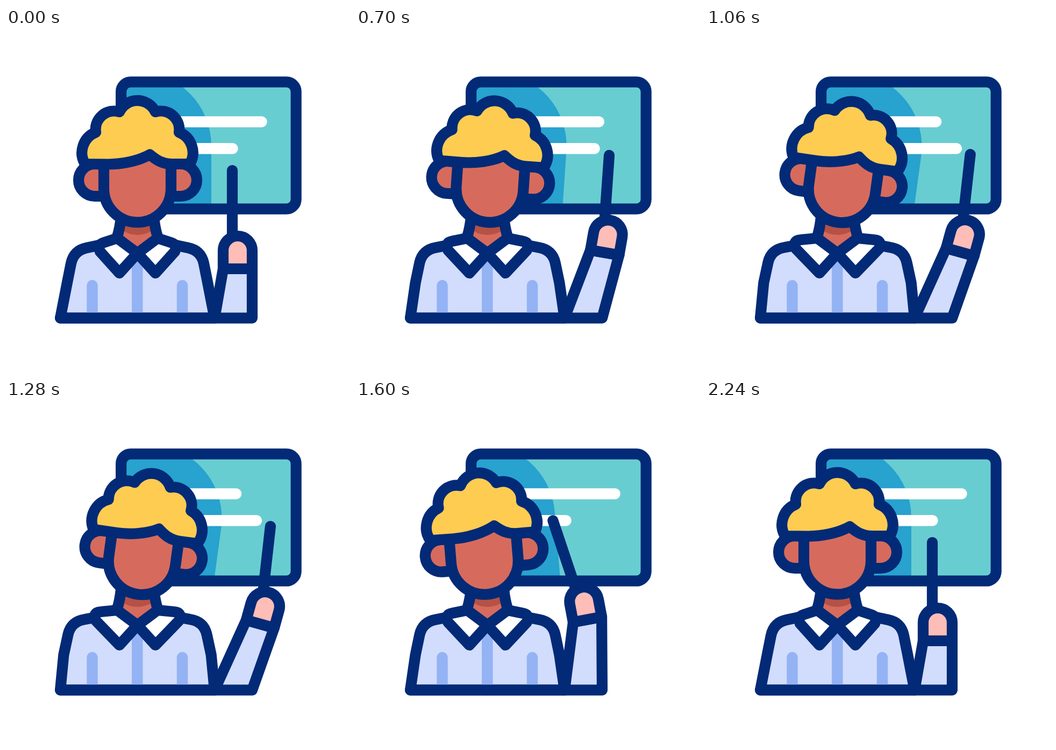
Write an HTML page that moves like this. It is 640 px wide and 640 px high and loops after 2.42 s.

```html
<!DOCTYPE html>
<html lang="en">
<head>
<meta charset="utf-8">
<title>Teacher at the board</title>
<style>
  html, body { margin: 0; width: 100%; height: 100%; overflow: hidden; background: #fff; }
  svg { display: block; width: 100%; height: 100%; }
  .ink { stroke: #032a76; stroke-width: 20.2; stroke-linecap: round; stroke-linejoin: round; }
  .open { fill: none; }
  .skin { fill: #d66b5d; }
  .shirt { fill: #d2dcfd; }
  .bar { stroke-width: 20.5; stroke-linecap: round; }
</style>
</head>
<body>
<svg viewBox="0 0 640 640">
  <defs>
    <clipPath id="screen"><rect x="214" y="100" width="326" height="237" rx="18"/></clipPath>
  </defs>

  <!-- board -->
  <g clip-path="url(#screen)">
    <rect x="214" y="100" width="326" height="237" fill="#68cdd1"/>
    <path id="shade" fill="#28a2ce" d="M106 219a138 138 0 0 1 276 0V420H106Z"/>
    <g class="bar" stroke="#fff">
      <path id="line1" d="M250 174.5H475.5"/>
      <path id="line2" d="M280 224.2H421.5"/>
    </g>
  </g>
  <rect class="ink open" x="214.1" y="100.3" width="325.6" height="236.4" rx="18"/>

  <!-- shirt and neck: left halves are mirrored -->
  <path id="coat" class="ink shirt"/>
  <use href="#coat" transform="translate(489) scale(-1 1)"/>
  <path class="bar" stroke="#94b3f4" d="M160.5 479V534M244.3 430V534M328 479V534"/>
  <path class="ink" d="M101 539.6H388"/>
  <path class="skin" d="M212 350H277L282 390L244.5 419L207 390Z"/>
  <path fill="#b65145" d="M212 350H277L281 371Q244.5 399 208 371Z"/>
  <path class="ink open" d="M214 352Q212 372 207 388M275 352Q277 372 282 388"/>
  <path id="collar" class="ink" fill="#fff"/>
  <use href="#collar" transform="translate(489) scale(-1 1)"/>

  <g id="head">
    <path class="ink skin" d="M182 253H165a30 30 0 0 0 0 60H186ZM307 253H325a30 30 0 0 1 0 60H303Z"/>
    <path class="ink skin" d="M182 236V299a62.5 62.5 0 0 0 125 0V236Z"/>
    <path class="ink" fill="#ffcc52" d="M147 253A41 41 0 0 1 167 194A34.4 34.4 0 0 1 211 156A37.2 37.2 0 0 1 278 156A34.4 34.4 0 0 1 322 194A41 41 0 0 1 342 253H310C290 253 279 245 267.5 235.5C245 248 215 253.5 190 253.5Z"/>
  </g>

  <!-- arm -->
  <path id="pointer" class="ink"/>
  <path id="sleeve" class="ink shirt"/>
  <path id="hand" class="ink" fill="#ffbdb8" d="M-27 34V0a27 27 0 0 1 54 0V34Z"/>
</svg>
<script>
  const LOOP = 2420;
  const parts = {};
  document.querySelectorAll('path[id], g[id]').forEach(el => parts[el.id] = el);
  const set = (id, name, value) => parts[id].setAttribute(name, value);

  const smooth = u => u * u * (3 - 2 * u);
  const settle = u => smooth(1 - (1 - u) ** 2); // quick start, long tail
  const progress = (t, from, to, ease) => ease(Math.min(1, Math.max(0, (t - from) / (to - from))));

  // Runs a pose through successive moves: [target pose, start, end, easing].
  const follow = (t, pose, moves) => moves.reduce((now, [goal, from, to, ease]) => {
    const p = progress(t, from, to, ease);
    return now.map((v, i) => v + (goal[i] - v) * p);
  }, pose);

  // hand x, hand y, hand angle, pointer tip x, tip y
  const arm = {
    rest: [431, 414, 0, 421, 265],
    lift: [445, 385, 0, 434, 240],
    right: [482, 384, 15.5, 492, 235],
    left: [422.3, 374.7, -11.5, 362, 224]
  };
  // head angle, shift of each line on the board
  const look = { rest: [0, 0, 0], right: [7.8, -47.5, 44.5], left: [-5.1, 8, -33.5] };

  function drawArm(t) {
    const [x, y, angle, tipX, tipY] = follow(t, arm.rest, [
      [arm.lift, 0, 400, smooth],
      [arm.right, 400, 1230, settle],
      [arm.left, 1280, 1760, settle],
      [arm.rest, 1760, 2240, smooth]
    ]);
    const c = Math.cos(angle * Math.PI / 180), s = Math.sin(angle * Math.PI / 180);
    const onHand = (dx, dy) => `${x + dx * c - dy * s} ${y + dx * s + dy * c}`;
    set('hand', 'transform', `translate(${x} ${y}) rotate(${angle})`);
    set('sleeve', 'd', `M388 539.6L${onHand(-27, 34)}L${onHand(27, 34)}L458 539.6Z`);
    set('pointer', 'd', `M${tipX} ${tipY}L${onHand(-10, -20)}`);
  }

  function drawLook(t) {
    const [turn, shift1, shift2] = follow(t, look.rest, [
      [look.right, 520, 1140, settle],
      [look.left, 1280, 1760, settle],
      [look.rest, 1760, 2240, smooth]
    ]);
    for (const id of ['head', 'shade']) set(id, 'transform', `rotate(${turn} 244.5 363)`);
    set('line1', 'transform', `translate(${shift1})`);
    set('line2', 'transform', `translate(${shift2})`);
  }

  function drawShirt(t) {
    const k = progress(t, 520, 1140, settle) * (1 - progress(t, 1280, 1920, smooth));
    set('coat', 'd', `M244.5 539.6H101L${113.8 - 6.5 * k} 474L${121 - 5.5 * k} ${438 - 2 * k}` +
      `Q${126 - 5 * k} ${414 - 2 * k} ${150 - 3 * k} ${409 - k}L207 397H244.5`);
    set('collar', 'd', `M207 391L${181 - 5 * k} ${399.5 - 5.5 * k}` +
      `Q${170 - 10 * k} ${403 - 8 * k} ${175 - 7.5 * k} ${416 - 5 * k}L211 456L244.5 419Z`);
  }

  function draw(now) {
    const t = now % LOOP;
    drawArm(t);
    drawLook(t);
    drawShirt(t);
    requestAnimationFrame(draw);
  }
  draw(performance.now());
</script>
</body>
</html>
```
